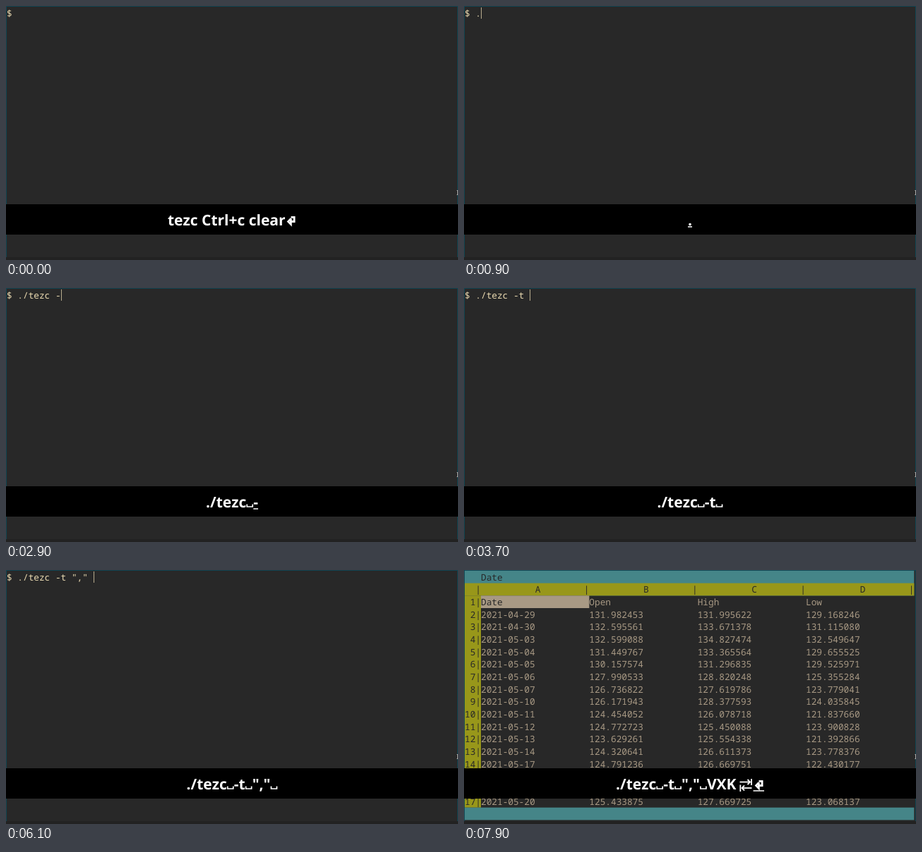
Recreate the animation shown at these times as an HTML page with a canvas. Size 640 px wide and 360 px high, loop 8 s.

```html
<!DOCTYPE html>
<html lang="en">
<head>
<meta charset="utf-8">
<title>Terminal session</title>
<style>
  html, body { margin: 0; width: 100%; height: 100%; overflow: hidden; background: #282828; }
  canvas { display: block; }
</style>
</head>
<body>
<canvas id="stage" width="640" height="360"></canvas>
<script>
const ctx = document.getElementById('stage').getContext('2d');
ctx.textRendering = 'geometricPrecision';
const LOOP = 8000, CELL = 23 / 3, ROW = 53 / 3;
const DARK = '#282828', CREAM = '#ebdbb2', TAN = '#a89984', TEAL = '#458588', OLIVE = '#98971a';
const MONO = `${CELL / 0.6}px "Noto Sans Mono", monospace`;
const BOLD = 'bold 21px "Noto Sans", "Open Sans", sans-serif';

// The typed keys and the moment of each press, in tenths of a second.
const keys = [...'./tezc␣-t␣","␣VXK⇥↵'];
const presses = [9, 11, 13, 15, 19, 22, 24, 29, 33, 35, 41, 51, 53, 57, 62, 64, 66, 70, 78];
const echoes = { '␣': ' ', '⇥': 'Q_Historical_data.csv ', '↵': '' };
const TABLE_AT = 7900;

const colX = col => 1 + col * CELL;
const rowY = row => 1 + row * ROW;

function rect(color, x, y, w, h) {
  ctx.fillStyle = color;
  ctx.fillRect(x, y, w, h);
}

// Fill a block of terminal cells.
function cells(color, col, row, cols, rows) {
  rect(color, colX(col), rowY(row), cols * CELL, rows * ROW);
}

function print(text, col, row, color) {
  ctx.font = MONO;
  ctx.fillStyle = color;
  ctx.fillText(text, colX(col), 14.6 + row * ROW);
}

function line(width, ...points) {
  ctx.lineWidth = width;
  ctx.strokeStyle = '#fff';
  ctx.beginPath();
  points.forEach(([x, y]) => ctx.lineTo(x, y));
  ctx.stroke();
}

// Key symbols, drawn relative to their left edge and the caption baseline.
const symbols = {
  '␣': { width: 10, draw() { line(1.7, [1, -4.5], [1, -1], [9, -1], [9, -4.5]); } },
  '⇥': { width: 24, draw() {
    line(1.8, [5, -10.5], [19.5, -10.5]);
    line(1.8, [16, -14], [19.5, -10.5], [16, -7]);
    line(1.8, [21.5, -15], [21.5, -6]);
    line(1.8, [22, -2], [8, -2]);
    line(1.8, [11.5, -5.5], [8, -2], [11.5, 1.5]);
    line(1.8, [5.8, -6.5], [5.8, 3]);
  } },
  '↵': { width: 15.5, draw() {
    line(2.8, [8, -11.6], [12.6, -11.6], [12.6, -5.5], [6, -5.5]);
    line(2.4, [8, -9.8], [3.8, -5.5], [8, -1.2], [8, -9.8]);
  } }
};

function caption(text, underlined) {
  rect('#000', 0, 281, 640, 43);
  ctx.font = BOLD;
  const chars = [...text];
  const widths = chars.map(c => symbols[c] ? symbols[c].width : ctx.measureText(c).width);
  let x = 320 - widths.reduce((a, b) => a + b, 0) / 2;
  chars.forEach((c, i) => {
    ctx.fillStyle = '#fff';
    if (symbols[c]) {
      ctx.save();
      ctx.translate(x, 311);
      symbols[c].draw();
      ctx.restore();
    } else ctx.fillText(c, x, 311);
    if (underlined && i === chars.length - 1) rect('#fff', x, 312.2, widths[i], 1.5);
    x += widths[i];
  });
}

function random(n) {
  const v = Math.sin(n * 127.1 + 3.7) * 43758.5453;
  return v - Math.floor(v);
}

function dateOf(i) {
  const day = i + 2 * Math.floor((i + 3) / 5); // skip weekends
  return new Date(Date.UTC(2021, 3, 29 + day)).toISOString().slice(0, 10);
}

// One day of a slowly falling and recovering price: date, open, high, low.
function dayRow(i) {
  const open = 128.2 + 4.5 * Math.cos(i * 0.28) + 2 * random(i) - 1;
  const high = open + 2.5 * random(i + 50);
  const low = open - 3 * random(i + 100);
  return [dateOf(i), ...[open, high, low].map(v => v.toFixed(6))];
}

const sheet = [['Date', 'Open', 'High', 'Low'], ...Array.from({ length: 16 }, (_, i) => dayRow(i))];

function table() {
  cells(TEAL, 0, 0, 83, 2);
  cells(OLIVE, 0, 1, 83, 1);
  cells(OLIVE, 0, 2, 3, 17);
  cells(TEAL, 0, 19, 83, 1);
  cells(TAN, 3, 2, 20, 1);
  print('Date', 3, 0, DARK);
  print('|', 2, 1, DARK);
  [...'ABCD'].forEach((name, i) => {
    print(name, 13 + 20 * i, 1, DARK);
    print('|', 22 + 20 * i, 1, DARK);
  });
  sheet.forEach((values, r) => {
    print(String(r + 1).padStart(2) + '|', 0, r + 2, DARK);
    values.forEach((value, c) => print(value, 3 + 20 * c, r + 2, r + c ? TAN : DARK));
  });
}

function prompt(t, pressed) {
  const text = '$ ' + pressed.map(c => echoes[c] ?? c).join('');
  print(text, 0, 0, CREAM);
  if (t >= 100) rect('#b8ac8d', Math.round(colX(text.length)), 2, 1, 16);
}

function windowFrame() {
  rect(DARK, 0, 0, 640, 360);
  rect('#222', 0, 356, 640, 4);
  rect('#124553', 0, 0, 640, 1);
  rect('#124553', 0, 0, 1, 356);
  rect('#124553', 639, 0, 1, 356);
}

function pointer() {
  rect('#aaa', 639, 261, 1, 7);
  rect('#777', 638, 261, 1, 1);
  rect('#777', 638, 267, 1, 1);
}

function draw(now) {
  const t = now % LOOP;
  const pressed = keys.filter((_, i) => t >= presses[i] * 100);
  windowFrame();
  if (t >= TABLE_AT) table();
  else prompt(t, pressed);
  if (t < 100) caption('tezc Ctrl+c clear↵', false);
  else if (pressed.length) caption(pressed.join(''), t - presses[pressed.length - 1] * 100 < 200);
  pointer();
  requestAnimationFrame(draw);
}
requestAnimationFrame(draw);
</script>
</body>
</html>
```
